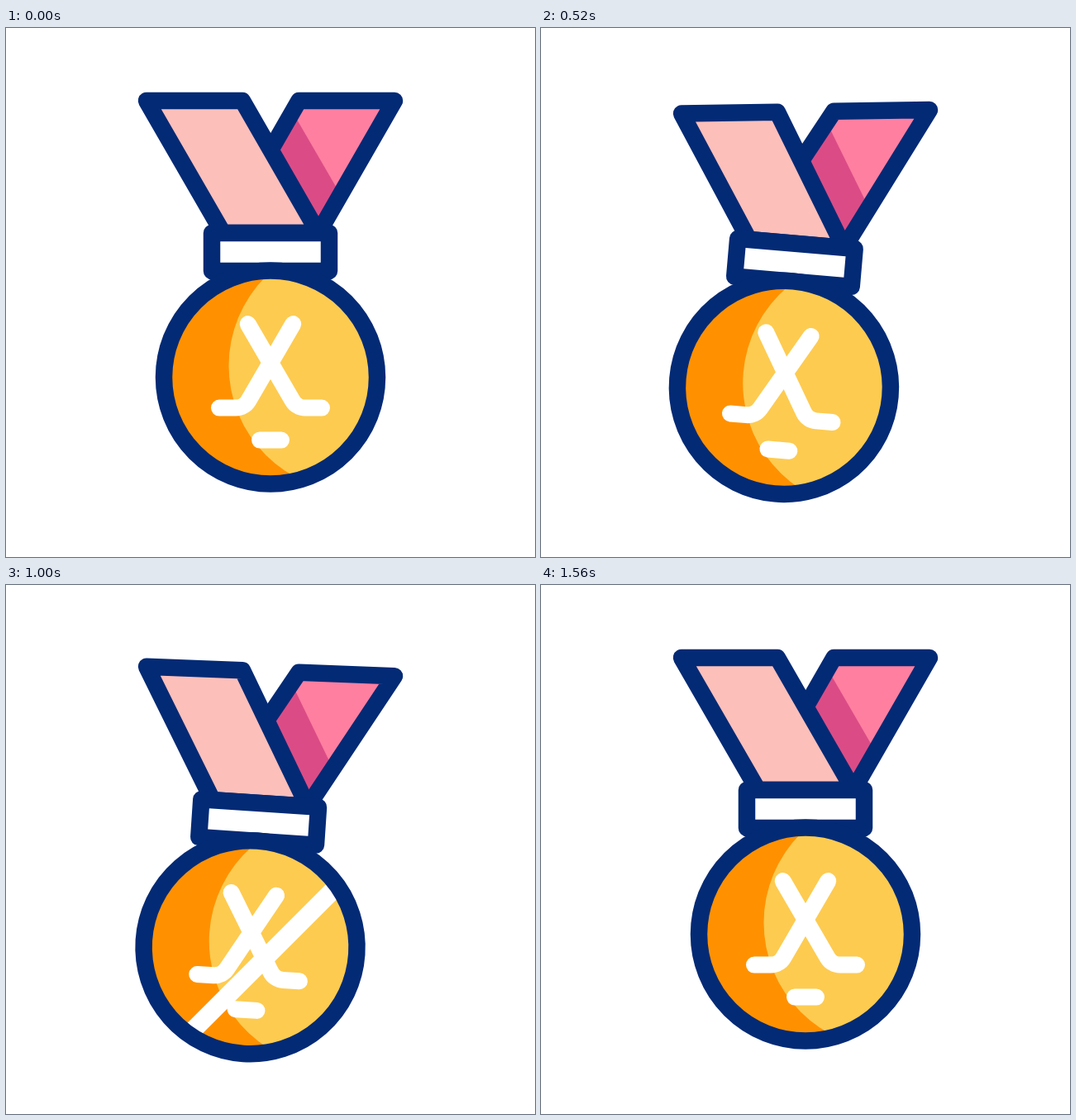
Recreate the animation shown at these times as an HTML page with a canvas. Size 640x640 px, loop 1.64 s.

```html
<!DOCTYPE html>
<html lang="en">
<head>
<meta charset="utf-8">
<title>Swinging medal</title>
<style>
html, body { margin: 0; height: 100%; overflow: hidden; background: #fff; }
canvas { display: block; }
</style>
</head>
<body>
<canvas id="stage" width="640" height="640"></canvas>
<script>
const ctx = document.getElementById('stage').getContext('2d');
const LOOP = 1640, STEP = 40;
const NAVY = '#032a75', ROSE = '#ff7fa1', PLUM = '#db4c86', BLUSH = '#fdbfba',
      ORANGE = '#ff9100', GOLD = '#fdcb50';

// Tracks are [time, value] pairs, eased between neighbours.
const TILT = [[100, 0], [360, 14.5], [640, -13], [960, 6], [1280, 0]];
const SWAY = [[120, 0], [400, -32], [660, 10.8], [980, -14.5], [1320, 0]];
const TURN = [[120, 0], [420, 13.2], [690, -13.5], [1020, 4], [1320, 0]];
const BOB = [[80, 0], [800, 18.9], [1530, 0]];

const smooth = x => x * x * (3 - 2 * x);
const smoother = x => x * x * x * (x * (6 * x - 15) + 10);
const mix = (a, b, k) => a.map((v, i) => v + (b[i] - v) * k);

function sample(track, t, ease = smooth) {
  if (t <= track[0][0]) return track[0][1];
  for (let i = 1; i < track.length; i++) {
    const [t0, v0] = track[i - 1], [t1, v1] = track[i];
    if (t < t1) return v0 + (v1 - v0) * ease((t - t0) / (t1 - t0));
  }
  return track[track.length - 1][1];
}

function polygon(points, fill, outlined) {
  ctx.beginPath();
  points.forEach(p => ctx.lineTo(...p));
  ctx.closePath();
  if (fill) { ctx.fillStyle = fill; ctx.fill(); }
  if (outlined) ctx.stroke();
}

function disc(x, y, r, fill) {
  ctx.beginPath();
  ctx.arc(x, y, r, 0, 7);
  ctx.fillStyle = fill;
  ctx.fill();
}

function stick(side) {
  ctx.beginPath();
  ctx.moveTo(-27.3 * side, -64.5);
  ctx.arcTo(31.8 * side, 37, 62 * side, 37, 18);
  ctx.lineTo(62 * side, 37);
  ctx.stroke();
}

function drawRibbons(top, left, right) {
  const innerTop = top(354.4), outerTop = top(470);
  const back = [innerTop, outerTop, right, left];
  polygon(back, ROSE);
  polygon([mix(innerTop, left, 0.0845), mix(outerTop, right, 0.71), right, left], PLUM);
  polygon(back, null, true);
  polygon([top(170), top(286), right, left], BLUSH, true);
}

function drawShine(t, angle) {
  const across = -106 + (t - 840) * 0.8;
  if (Math.abs(across) > 130) return;
  ctx.save();
  ctx.rotate(Math.PI / 4 - angle);
  ctx.fillStyle = '#fff';
  ctx.fillRect(across - 11, -140, 22, 280);
  ctx.restore();
}

function drawMedal(x, y, angle, t) {
  ctx.save();
  ctx.translate(x, y);
  ctx.rotate(angle);
  polygon([[-71, -23], [71, -23], [71, 23], [-71, 23]], '#fff', true);

  ctx.translate(0, 151.6);
  ctx.save();
  ctx.beginPath();
  ctx.arc(0, 0, 129, 0, 7);
  ctx.clip();
  disc(0, 0, 130, ORANGE);
  disc(102, -14, 152.5, GOLD);
  drawShine(t, angle);
  ctx.restore();

  ctx.beginPath();
  ctx.arc(0, 0, 129, 0, 7);
  ctx.stroke();

  ctx.strokeStyle = '#fff';
  ctx.lineWidth = 20;
  stick(1);
  stick(-1);
  ctx.beginPath();
  ctx.moveTo(-13, 76);
  ctx.lineTo(13, 76);
  ctx.stroke();
  ctx.restore();
}

function draw(t) {
  const bob = sample(BOB, t, smoother), tilt = sample(TILT, t), sway = sample(SWAY, t);
  const angle = sample(TURN, t) * Math.PI / 180;
  const x = 320 + sway, y = 271 + bob - sway * sway / 400;
  const cos = Math.cos(angle), sin = Math.sin(angle);
  const top = px => [px, 88 + bob + tilt * (px - 320) / 150];
  const onClasp = (dx, dy) => [x + dx * cos - dy * sin, y + dx * sin + dy * cos];

  ctx.fillStyle = '#fff';
  ctx.fillRect(0, 0, 640, 640);
  ctx.strokeStyle = NAVY;
  ctx.lineWidth = 20.5;
  ctx.lineJoin = ctx.lineCap = 'round';
  drawRibbons(top, onClasp(-57.6, -23), onClasp(58, -23));
  drawMedal(x, y, angle, t);
}

function tick() {
  draw(Math.floor(performance.now() % LOOP / STEP) * STEP);
  requestAnimationFrame(tick);
}
tick();
</script>
</body>
</html>
```
